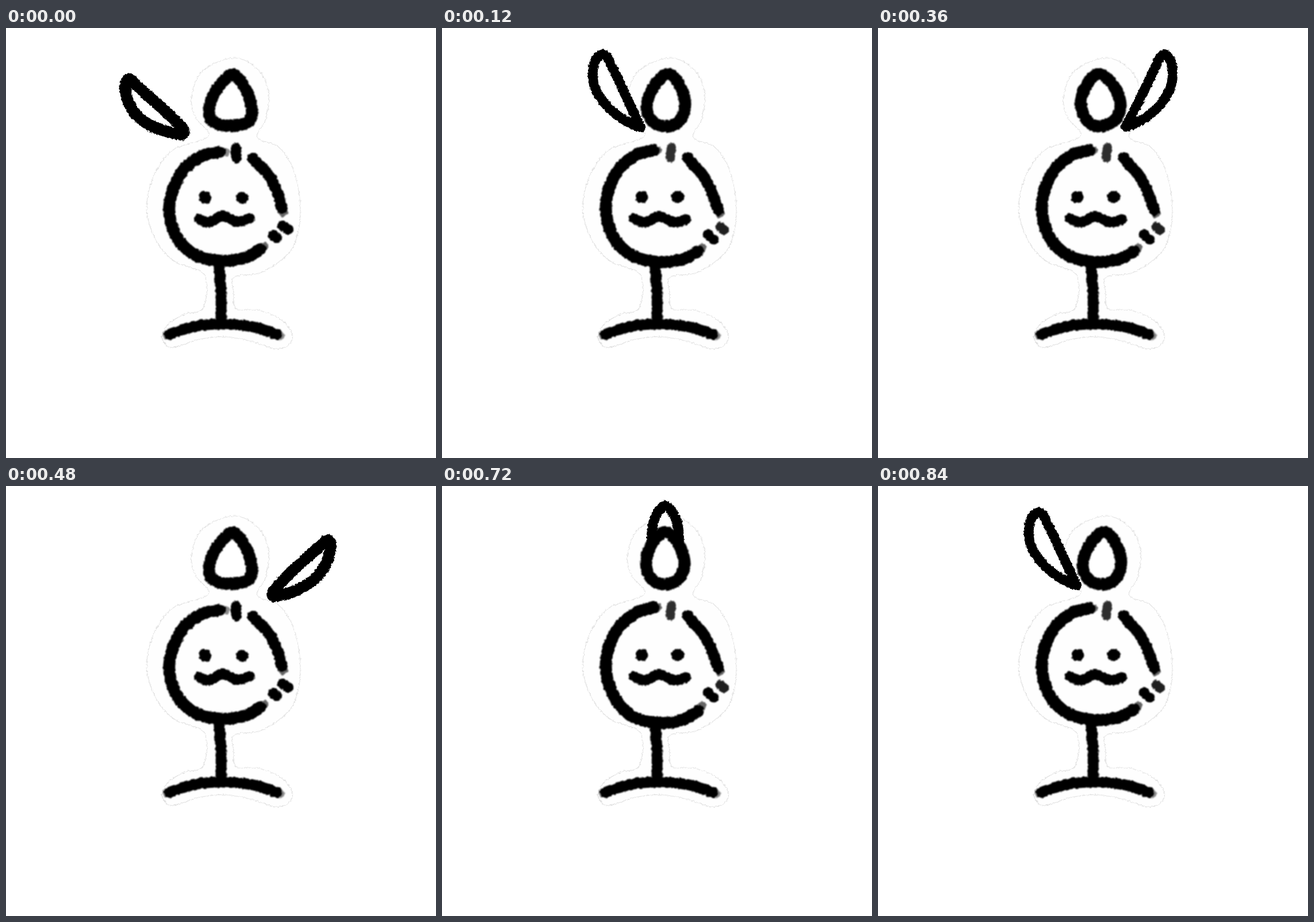
An HTML page for the animation above (0.96 s loop, 748 by 748 pixels).

```html
<!DOCTYPE html>
<html lang="en">
<head>
<meta charset="utf-8">
<title>Swinging leaf</title>
<style>
  html, body { margin: 0; width: 100%; height: 100%; overflow: hidden; background: #fff; }
  svg { display: block; width: 100vw; height: 100vh; }
  path { fill: none; stroke: #000; stroke-linecap: round; stroke-linejoin: round; }
</style>
</head>
<body>
<svg viewBox="0 0 748 748">
  <defs>
    <filter id="soft" filterUnits="userSpaceOnUse" x="0" y="0" width="748" height="748" color-interpolation-filters="sRGB">
      <feTurbulence type="fractalNoise" baseFrequency=".18" numOctaves="2" seed="4"/>
      <feDisplacementMap in="SourceGraphic" scale="5" xChannelSelector="R" yChannelSelector="G"/>
      <feGaussianBlur stdDeviation="1.3"/>
    </filter>
    <filter id="rough" filterUnits="userSpaceOnUse" x="0" y="0" width="748" height="748" color-interpolation-filters="sRGB">
      <feTurbulence type="fractalNoise" baseFrequency=".25" numOctaves="2" seed="9"/>
      <feDisplacementMap in="SourceGraphic" scale="5" xChannelSelector="R" yChannelSelector="G"/>
      <feGaussianBlur stdDeviation=".35"/>
    </filter>
  </defs>
  <g id="halo" filter="url(#rough)"></g>
  <g id="leaf" filter="url(#rough)"></g>
  <g id="body" filter="url(#soft)"></g>
</svg>
<script>
const STEP = 120;
const ORDER = [0, 1, 2, 3, 4, 3, 2, 1];
const $ = id => document.getElementById(id);

// Smooth path through points given as "x,y x,y ..."
function curve(text, closed) {
  const p = text.split(' ').map(s => s.split(',').map(Number));
  const n = p.length;
  const at = i => closed ? p[(i + n) % n] : p[Math.max(0, Math.min(n - 1, i))];
  let d = 'M' + p[0];
  for (let i = 0; i < n - (closed ? 0 : 1); i++) {
    const [a, b, c, e] = [at(i - 1), at(i), at(i + 1), at(i + 2)];
    const c1 = b.map((v, k) => v + (c[k] - a[k]) / 6);
    const c2 = c.map((v, k) => v - (e[k] - b[k]) / 6);
    d += `C${c1} ${c2} ${c}`;
  }
  return d + (closed ? 'Z' : '');
}
const draw = (d, width, extra = '') => `<path d="${d}" stroke-width="${width}" ${extra}/>`;
const line = (pts, width, extra) => draw(curve(pts), width, extra);
const faint = o => `stroke-opacity="${o}"`;

const halo = curve('352,188 329,155 323,118 343,74 397,52 440,74 457,115 452,158 437,191 473,206 500,246 512,312 504,370 ' +
  '482,401 442,426 397,433 396,460 400,488 440,491 478,507 498,532 491,552 468,558 430,546 380,537 330,543 ' +
  '290,556 272,541 281,516 310,498 343,487 345,430 292,405 262,371 245,318 256,260 289,213', true);

const leaves = [
  ['M211,90C202,104 212,138 230,154C248,173 278,181 306,186Q313,182 307,174C287,151 243,116 218,91Q214,87 211,90Z', 20],
  ['M278,46C262,50 258,84 267,106C279,134 312,163 346,173C330,143 313,101 292,60Q286,44 278,46Z', 17],
  ['M388,34C370,42 361,75 366,106Q371,143 388,165Q406,143 411,106C416,75 406,42 388,34Z', 17],
  ['M499,46C513,51 517,84 507,108C495,136 464,163 431,172C446,143 466,104 484,64Q492,45 499,46Z', 17],
  ['M562,95C570,103 559,140 541,158C520,178 491,189 466,192Q460,189 467,181C491,151 528,122 553,98Q559,92 562,95Z', 20]
];

const drop = 'M390,82C372,95 353,121 353,147C353,164 369,170 391,170C414,170 428,164 428,147C427,120 412,93 398,82Q394,79 390,82Z';
const tilted = [
  '392,80 367,104 356,138 367,163 392,171 414,161 423,132 412,97',
  '388,80 364,102 355,136 365,162 388,171 411,162 422,136 412,102',
  '385,80 411,102 422,134 412,160 385,171 363,160 353,130 364,97'
];
const drops = [drop, ...tilted.map(t => curve(t, true)), drop];

const foot = line('371,418 374,460 374,510', 19) + line('284,533 328,519 376,515 430,520 471,533', 19) +
  line('281,534 284,533', 17, faint(.45)) + line('473,534 476,535', 17, faint(.45));

// Wide pose, used at both ends of the swing
const wide = line('372,216 340,223 304,253 284,310 296,362 330,395 376,405 418,399 442,385', 21) +
  line('380,216 382,216', 15, faint(.45)) + line('442,385 449,380', 15, faint(.6)) +
  line('429,227 457,256 473,288 480,313', 20) + line('480,314 482,320', 17, faint(.6)) +
  line('400,209 401,226', 18) + line('465,361 471,365', 18) + line('481,344 491,350', 18) +
  line('345,293 347,296', 20) + line('410,295 412,296', 20) +
  line('336,332 352,338 377,327 402,337 424,331', 18);

// Tall pose; drop is how far the chin sinks
function tall(sink, eye) {
  const top = 213 - sink / 3;
  return line(`368,${top} 335,222 300,257 285,310 297,362 330,${395 + sink} 376,${407 + sink} 418,${402 + sink} 445,${389 + sink / 2}`, 21) +
    line(`371,${top} 375,${top}`, 15, faint(.6)) + line('446,388 452,382', 15, faint(.6)) +
    line('427,226 455,258 472,292 481,317', 20) + line('481,318 483,322', 16, faint(.6)) +
    line('399,208 397,226', 16, faint(.82)) + line('462,359 473,368', 17) +
    line('484,346 490,351', 17, faint(.88)) +
    line(`${eye},294 ${eye + 1},294`, 21) + line('409,294 411,294', 21) +
    line('334,331 352,338 378,328 404,338 424,333', 18);
}
const faces = [wide, tall(0, 347), tall(5, 347), tall(0, 346), wide];

$('halo').innerHTML = draw(halo, 1.2, 'style="fill:#fefefe;stroke:#e2e2e2"');

let shown = -1;
function render(ms) {
  const pose = ORDER[Math.floor(ms / STEP) % ORDER.length];
  if (pose === shown) return;
  shown = pose;
  const white = 'style="fill:#fff"';
  $('leaf').innerHTML = draw(...leaves[pose], white);
  $('body').innerHTML = draw(drops[pose], 21, white) + foot + faces[pose];
}

const start = performance.now();
function tick() {
  render(performance.now() - start);
  requestAnimationFrame(tick);
}
tick();
</script>
</body>
</html>
```
